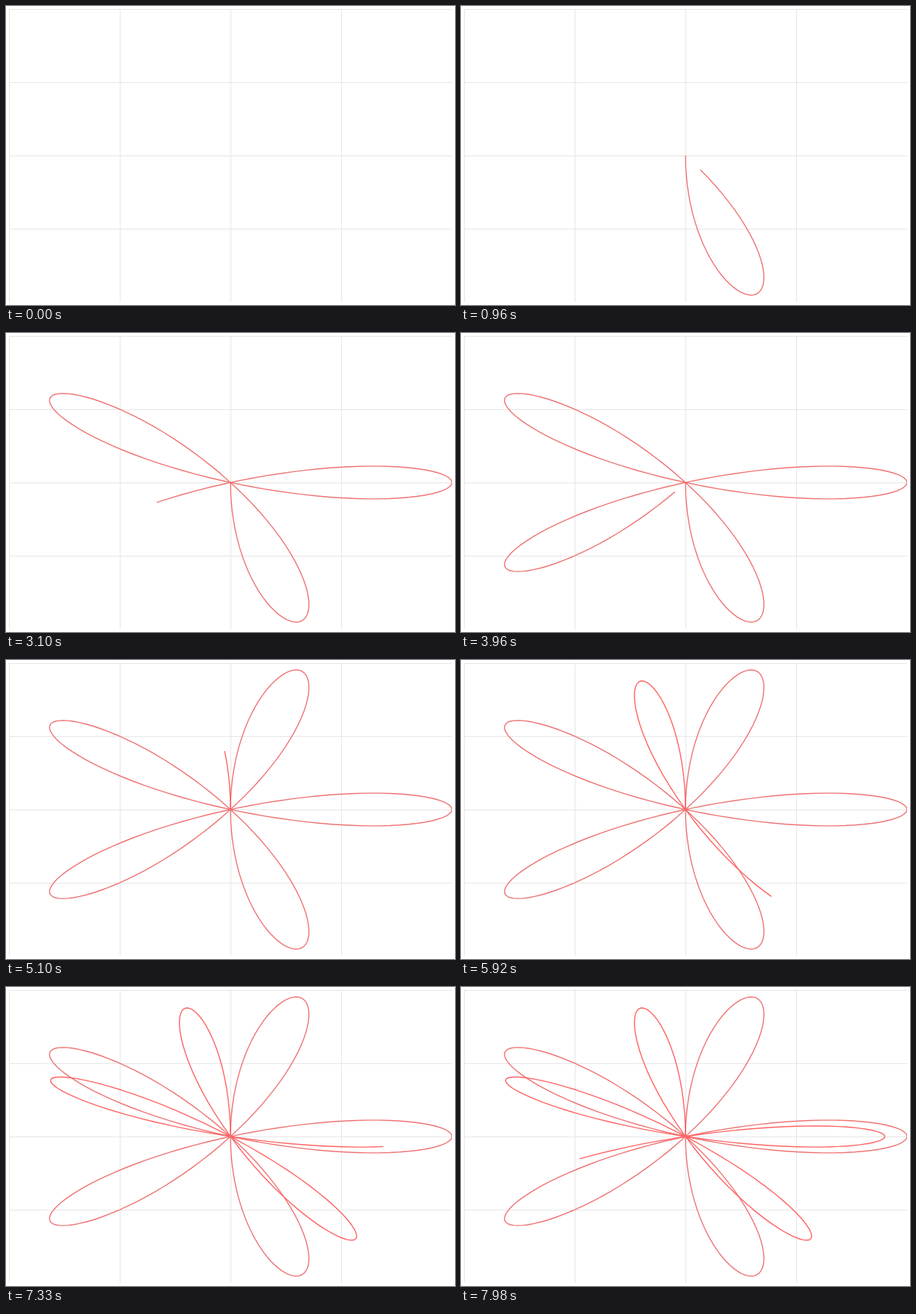
Recreate the animation shown at these times as an HTML page with a canvas. Size 600 px wide and 400 px high, loop 8 s.

```html
<!DOCTYPE html>
<html lang="en">
<head>
<meta charset="utf-8">
<title>Rose curves</title>
<style>
  html, body { margin: 0; width: 100%; height: 100%; overflow: hidden; background: #fff; }
  canvas { display: block; width: 600px; height: 400px; }
</style>
</head>
<body>
<canvas id="stage" width="600" height="400"></canvas>
<script>
const ctx = document.getElementById('stage').getContext('2d');
const LOOP = 8000, FPS = 48, STEPS = 240, LAST = LOOP * FPS / 1000 - 1;
const CX = 300, CY = 200, RX = 296, RY = 196;
const roses = [
  { petals: 5, size: 1, color: '#ee7474' },
  { petals: 7, size: 0.9, color: '#ff6464' },
];

function drawGrid() {
  ctx.fillStyle = '#e6e6e6';
  for (let i = 0; i < 4; i++) {
    ctx.fillRect(4 + i * RX / 2, 4, 1, 2 * RY);
    ctx.fillRect(4, 4 + i * RY / 2, 2 * RX, 1);
  }
}

// Traces r = size * cos(petals * angle) from -90 to 90 degrees, up to the given step.
function drawRose({ petals, size, color }, end) {
  ctx.beginPath();
  for (let i = 0; i <= end; i++) {
    const angle = Math.PI * (i / (STEPS - 1) - 0.5);
    const r = size * Math.cos(petals * angle);
    ctx.lineTo(CX + RX * r * Math.cos(angle), CY - RY * r * Math.sin(angle));
  }
  ctx.strokeStyle = color;
  ctx.stroke();
}

function draw(time) {
  // Steps fall on a 10 ms clock, hence the half-tick offset.
  const step = Math.min(LAST, Math.floor((time + 4.9) * FPS / 1000));
  ctx.clearRect(0, 0, 600, 400);
  drawGrid();
  roses.forEach((rose, i) => {
    const end = Math.min(STEPS - 1, step - i * STEPS);
    if (end > 0) drawRose(rose, end);
  });
}

ctx.lineWidth = 1.4;
ctx.lineJoin = 'round';
ctx.beginPath();
ctx.rect(CX - RX, CY - RY, 2 * RX, 2 * RY);
ctx.clip();

const start = performance.now();
function tick() {
  draw((performance.now() - start) % LOOP);
  requestAnimationFrame(tick);
}
tick();
</script>
</body>
</html>
```
